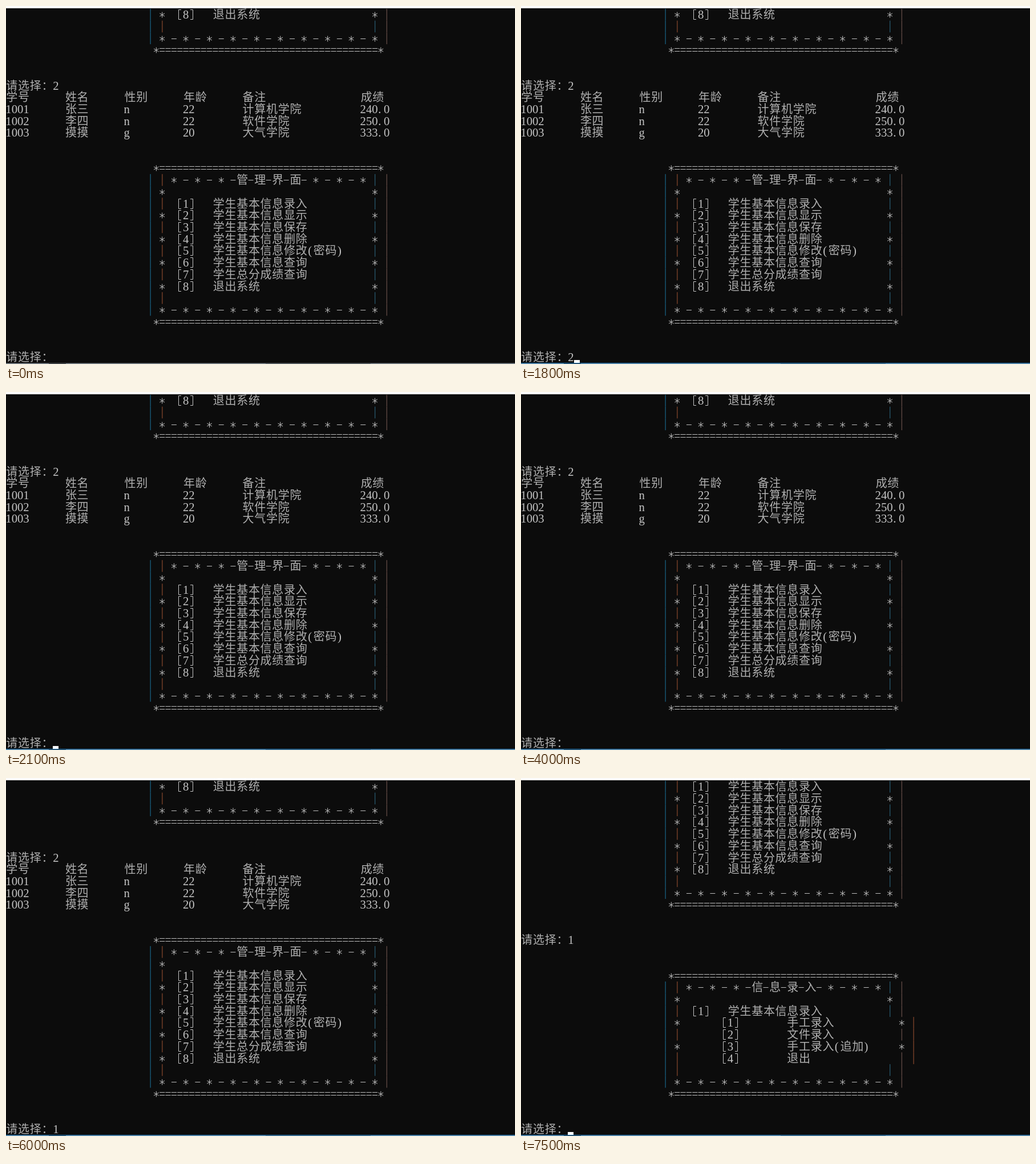
Recreate the animation shown at these times as an HTML page with a canvas. Size 892x628 px, loop 8 s.

```html
<!DOCTYPE html>
<html lang="zh-CN">
<head>
<meta charset="utf-8">
<style>
  html, body { margin: 0; width: 100%; height: 100%; overflow: hidden; background: #0c0c0c; }
  canvas { display: block; }
</style>
</head>
<body>
<canvas id="stage" width="892" height="628"></canvas>
<script>
const ctx = document.getElementById('stage').getContext('2d');
const CELL = 10.355, ROW = 20.71, TOP = 4.9, LAST_ROW = 29, LOOP = 8000;
const LATIN = '20.7px "Liberation Serif", serif';
const CJK = '300 20px "Noto Sans CJK SC Light", "Noto Sans CJK SC", "Noto Sans CJK", sans-serif';
const BAR_COLORS = { 24: '#1b5f80', 26: '#81452c', 62: '#28566c', 64: '#604a45', 66: '#81452c' };

// Text measured in terminal cells: wide characters take two.
const isWide = ch => ch > '\u2e80';
const cells = text => [...text].reduce((n, ch) => n + (isWide(ch) ? 2 : 1), 0);
const pad = (text, width) => text + ' '.repeat(Math.max(0, width - cells(text)));

function box(title, items) {
  const rule = ' '.repeat(25) + '*' + '='.repeat(37) + '*';
  const side = (mark, body, width = 35) =>
    ' '.repeat(24) + '| ' + mark + pad(body, width) + mark + ' |';
  const heading = ` * - * - * -${[...title].join('-')}- * - * - * `;
  const rows = [heading, '', ...items].map((body, i) =>
    side('|*'[i % 2], body, body.startsWith('       [') ? 37 : 35));
  return [rule, ...rows, side('|', ''), side('*', ' - *'.repeat(8) + ' - '), rule];
}

const item = (label, i) => `  [${i + 1}]   ${label}`;
const subItem = (label, i) => `       [${i + 1}]        ${label}`;

const menu = box('管理界面', [
  '学生基本信息录入', '学生基本信息显示', '学生基本信息保存', '学生基本信息删除',
  '学生基本信息修改(密码)', '学生基本信息查询', '学生总分成绩查询', '退出系统'
].map(item));
const entryMenu = box('信息录入', [
  item('学生基本信息录入', 0),
  ...['手工录入', '文件录入', '手工录入(追加)', '退出'].map(subItem)
]);
const table = [
  ['学号', '姓名', '性别', '年龄', '备注', '成绩'],
  ['1001', '张三', 'n', '22', '计算机学院', '240.0'],
  ['1002', '李四', 'n', '22', '软件学院', '250.0'],
  ['1003', '摸摸', 'g', '20', '大气学院', '333.0']
].map(row => row.map((text, i) => pad(text, i === 4 ? 20 : 10)).join(''));

const gap = ['', ''];
const listing = [...menu, ...gap, '请选择：2', ...table, ...gap];
const log = [...listing, ...listing, ...menu, ...gap, '请选择：1', ...gap,
  ...entryMenu, ...gap, '请选择：'];

// [start ms, current log line, characters shown on it, cursor visible]
const states = [
  [0, 39, 4, 0], [1100, 39, 4, 1], [1600, 39, 4, 0], [1800, 39, 5, 1],
  [2000, 48, 0, 1], [2100, 62, 4, 1], [3100, 62, 4, 0], [3600, 62, 4, 1],
  [4000, 62, 4, 0], [4500, 62, 4, 1], [5000, 62, 4, 0], [5500, 62, 4, 1],
  [5600, 62, 5, 1], [6000, 62, 5, 0], [6500, 62, 5, 1], [7000, 62, 5, 0],
  [7400, 71, 0, 1], [7500, 78, 4, 1]
];

function rect(color, x, y, w, h) {
  ctx.fillStyle = color;
  ctx.fillRect(x, y, w, h);
}

function star(x, y) {
  ctx.beginPath();
  for (const [dx, dy] of [[0, 5], [4.3, 2.6], [4.3, -2.6]]) {
    ctx.moveTo(x - dx, y - dy);
    ctx.lineTo(x + dx, y + dy);
  }
  ctx.stroke();
}

// dir 1 opens to the right, -1 to the left.
function bracket(x, y, dir) {
  const stem = Math.floor(x - dir * 2) + 0.5;
  ctx.beginPath();
  ctx.moveTo(stem + dir * 4.5, y - 8.5);
  ctx.lineTo(stem, y - 8.5);
  ctx.lineTo(stem, y + 8.5);
  ctx.lineTo(stem + dir * 4.5, y + 8.5);
  ctx.stroke();
}

function drawChar(ch, col, row) {
  const wide = isWide(ch);
  const x = wide ? (col + 1) * CELL : (col + 0.5) * CELL - 0.7;
  const y = TOP + (row + 0.5) * ROW;
  const line = Math.round(y);
  if (ch === '|') rect(BAR_COLORS[col], x - 0.5, y - ROW / 2, 1.3, ROW);
  else if (ch === '*') star(x, line + 0.5);
  else if (ch === '[') bracket(x, line, 1);
  else if (ch === ']') bracket(x, line, -1);
  else if (ch === '-') rect('#bdbdbd', x - 4.5, line, 9, 1);
  else if (ch === '=') {
    rect('#bdbdbd', x - 4.6, line - 3, 9.2, 1);
    rect('#bdbdbd', x - 4.6, line + 2, 9.2, 1);
  } else if (ch !== ' ') {
    ctx.font = wide ? CJK : LATIN;
    ctx.fillStyle = wide ? '#b0b0b0' : '#c4c4c4';
    ctx.fillText(ch, ch === '.' ? x - 2 : x, Math.round(y + 7));
  }
}

function drawLine(text, row) {
  let col = 0;
  for (const ch of text) {
    drawChar(ch, col, row);
    col += isWide(ch) ? 2 : 1;
  }
}

function drawEdges(t) {
  rect('#fff', 0, 0, 892, 4);
  rect(t < 600 ? '#4b4d4f' : '#1778bd', 0, 626, 892, 1);
  rect('#7c8993', 0, 627, 892, 1);
  rect('#30363a', 75, 627, 30, 1);
  rect('#555f68', 455, 627, 184, 1);
}

function render(t) {
  const [, current, shown, cursor] = states.findLast(state => state[0] <= t);
  const first = current - LAST_ROW;
  const typed = log[current].slice(0, shown);
  rect('#0c0c0c', 0, 0, 892, 628);
  ctx.textAlign = 'center';
  ctx.strokeStyle = '#c4c4c4';
  ctx.lineWidth = 1;
  for (let i = first; i < current; i++) drawLine(log[i], i - first);
  drawLine(typed, LAST_ROW);
  drawEdges(t);
  if (cursor) rect('#fff', Math.floor(cells(typed) * CELL), 621, 10, 5);
}

function tick() {
  render(performance.now() % LOOP);
  requestAnimationFrame(tick);
}
tick();
</script>
</body>
</html>
```
